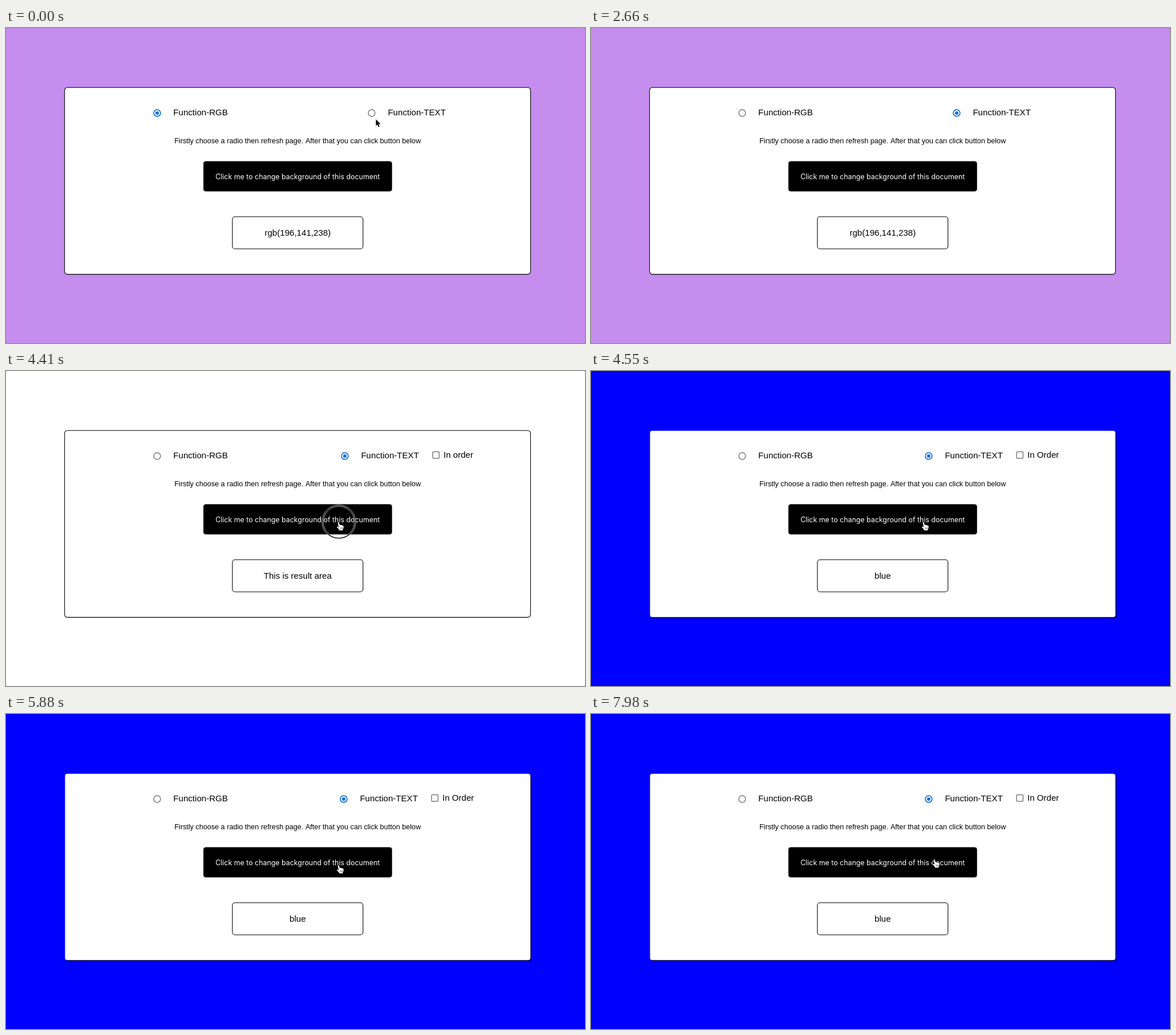
These frames come from a looping animation (1015 px wide and 552 px high, 8 s). An HTML page with a canvas:

```html
<!DOCTYPE html>
<html lang="en">
<head>
<meta charset="utf-8">
<title>Background changer</title>
<style>
html, body { margin: 0; width: 100%; height: 100%; overflow: hidden; background: #fff; }
canvas { display: block; width: 1015px; height: 552px; }
</style>
</head>
<body>
<canvas id="stage" width="1015" height="552"></canvas>
<script>
const ctx = document.getElementById('stage').getContext('2d');
const LOOP = 8000, STEP = 70;
const SANS = '"Liberation Sans", Arial, sans-serif';
const GREY = '#7b7b7b', ACCENT = '#1673d9';

// Page states, each valid from its start time
const RGB_PAGE = { bg: '#c48dee', result: 'rgb(196,141,238)', radio: 641 };
const TEXT_PAGE = { textMode: true, radio: 592, order: 'In Order', shadow: true };
const pages = [
  { at: 0, ...RGB_PAGE },
  { at: 630, ...RGB_PAGE, textMode: true },
  { at: 2730, bg: '#fff', result: 'This is result area', textMode: true, radio: 594, order: 'In order' },
  { at: 4550, ...TEXT_PAGE, bg: '#00f', result: 'blue' },
  { at: 5250, ...TEXT_PAGE, bg: '#f00', result: 'red' },
  { at: 5880, ...TEXT_PAGE, bg: '#00f', result: 'blue' }
];

const smooth = p => p * p * (3 - 2 * p);
const easeIn = p => p * p;
const easeOut = p => 1 - (1 - p) * (1 - p);
const moves = [
  { from: 0, to: 490, x: 642, y: 150, ease: smooth },
  { from: 910, to: 1330, x: -26, y: -21, ease: easeIn },
  { from: 3080, to: 3500, x: 708, y: 179, ease: easeOut },
  { from: 3710, to: 4270, x: 583, y: 264, ease: smooth },
  { from: 6020, to: 6650, x: 757, y: 141, ease: smooth },
  { from: 6860, to: 7700, x: 636, y: 213, ease: smooth },
  { from: 7700, to: 7980, x: 602, y: 254, ease: smooth }
];
const clicks = [
  { from: 490, to: 630, r: 22 },
  { from: 4410, to: 4550, r: 30 },
  { from: 5110, to: 5250, r: 30 },
  { from: 5740, to: 5880, r: 30 }
];

function cursorAt(t) {
  let x = 648, y = 159;
  for (const m of moves) {
    if (t <= m.from) break;
    const p = m.ease(Math.min(1, (t - m.from) / (m.to - m.from)));
    x += (m.x - x) * p;
    y += (m.y - y) * p;
  }
  return { x, y };
}

function box(x, y, w, h, r, fill, stroke, width = 1) {
  ctx.beginPath();
  ctx.roundRect(x, y, w, h, r);
  if (fill) { ctx.fillStyle = fill; ctx.fill(); }
  if (stroke) { ctx.strokeStyle = stroke; ctx.lineWidth = width; ctx.stroke(); }
}

function text(str, x, y, size, align = 'left', color = '#000', font = SANS) {
  ctx.font = `${size}px ${font}`;
  ctx.textAlign = align;
  ctx.fillStyle = color;
  ctx.fillText(str, x, y);
}

function ring(x, y, r, color, width) {
  ctx.beginPath();
  ctx.arc(x, y, r, 0, Math.PI * 2);
  ctx.strokeStyle = color;
  ctx.lineWidth = width;
  ctx.stroke();
}

function radio(x, checked) {
  ring(x, 149, 5.9, checked ? ACCENT : GREY, checked ? 1.8 : 1.5);
  if (!checked) return;
  ctx.beginPath();
  ctx.arc(x, 149, 3.1, 0, Math.PI * 2);
  ctx.fillStyle = ACCENT;
  ctx.fill();
}

function drawPage(page) {
  ctx.fillStyle = page.bg;
  ctx.fillRect(0, 0, 1015, 552);
  ctx.fillStyle = 'rgba(0,0,0,.35)';
  for (const x of [0, 1014]) for (const y of [0, 551]) ctx.fillRect(x, y, 1, 1);

  if (page.shadow) {
    ctx.save();
    ctx.shadowColor = 'rgba(0,0,0,.85)';
    ctx.shadowBlur = 2;
    ctx.shadowOffsetX = ctx.shadowOffsetY = 1.5;
    box(103.5, 104.7, 815.8, 326.5, 4, '#fff');
    ctx.restore();
  } else {
    box(102.7, 104.2, 816.8, 327.4, 5, '#fff', '#000', 1.1);
  }

  radio(265, !page.textMode);
  text('Function-RGB', 293.3, 152.7, 15.1);
  radio(page.radio, page.textMode);
  text('Function-TEXT', page.radio + 28.4, 152.7, 15.1);
  if (page.order) {
    box(page.radio + 154, 141.6, 11.4, 11.4, 1.5, '#fff', GREY, 1.5);
    text(page.order, page.radio + 173, 152.4, 15.1);
  }
  text('Firstly choose a radio then refresh page. After that you can click button below',
    511.2, 202, 12.65, 'center');

  box(346.2, 233.7, 330.3, 52.4, 4, '#000', '#333', 0.8);
  text('Click me to change background of this document', 511.3, 264.5, 12.4, 'center', '#fff', 'Inter, sans-serif');
  box(396.9, 330.7, 228.9, 56.3, 4.5, '#fff', '#000', 1.1);
  text(page.result, 511.3, 364.2, 15.1, 'center');
}

function shape(points, fill, stroke, width) {
  ctx.beginPath();
  for (const [x, y] of points) ctx.lineTo(x, y);
  ctx.closePath();
  ctx.lineJoin = 'round';
  ctx.strokeStyle = stroke;
  ctx.lineWidth = width;
  ctx.stroke();
  ctx.fillStyle = fill;
  ctx.fill();
}

const ARROW = [[.5, 1], [.5, 12.6], [3.1, 10.2], [5, 14.5], [6.9, 13.7], [5, 9.5], [8.6, 9.5]];
const HAND = [[-1.4, 1.6], [-.4, .8], [.7, 1.6], [2, 6], [3.2, 5.2], [4.4, 6.2], [5.6, 5.8],
  [6.6, 7], [7.8, 6.6], [8.8, 8], [8.6, 11.5], [7.6, 13.2], [7.4, 15.3], [1.2, 15.3],
  [.6, 13.4], [-3, 9.8], [-2.7, 8.7], [-1.2, 8.8], [.3, 10]];

function drawCursor({ x, y }) {
  const overButton = x > 346 && x < 676 && y > 233 && y < 286;
  ctx.save();
  ctx.translate(x, y);
  if (overButton) {
    shape(HAND, '#fff', '#000', 1.6);
    ctx.fillStyle = '#555';
    for (const dx of [2.5, 4.5, 6.5]) ctx.fillRect(dx, 10, .8, 3.4);
  } else {
    shape(ARROW, '#000', '#fff', 1.6);
  }
  ctx.restore();
}

function drawClick({ x, y }, r) {
  ring(x + .5, y + .5, r - 1.4, '#000', 1.8);
  ring(x + .5, y + .5, r - .4, '#ddd', .8);
  ring(x + .5, y + .5, r - 2.6, '#ddd', .8);
}

function frame(now) {
  const t = Math.floor((now % LOOP) / STEP) * STEP;
  const cursor = cursorAt(t);
  const click = clicks.find(c => t >= c.from && t < c.to);
  drawPage(pages.findLast(p => t >= p.at));
  if (click) drawClick(cursor, click.r);
  drawCursor(cursor);
  requestAnimationFrame(frame);
}
frame(performance.now());
</script>
</body>
</html>
```
